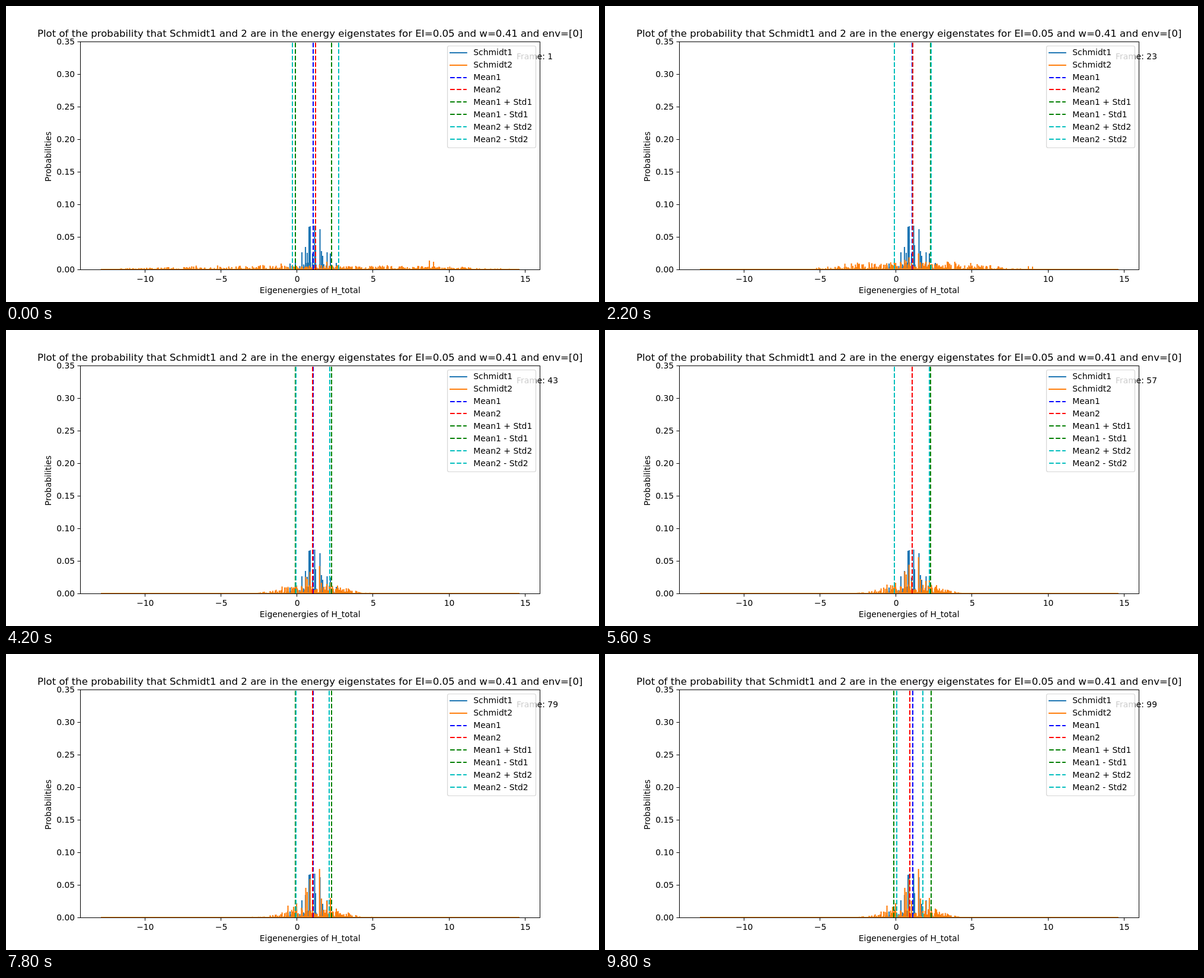
Write an HTML page that moves like this. It is 1000 px wide and 500 px high and loops after 9.9 s.

```html
<!DOCTYPE html>
<html lang="en">
<head>
<meta charset="utf-8">
<title>Eigenstate probabilities</title>
<style>
  html, body { margin: 0; width: 100%; height: 100%; overflow: hidden; background: #fff; }
  svg { display: block; width: 1000px; height: 500px; }
  text { font: 13.889px "DejaVu Sans", sans-serif; fill: #000; }
  .title { font-size: 16.605px; }
  .mid { text-anchor: middle; }
  .end { text-anchor: end; }
  .line { fill: none; stroke-width: 2.083; }
  .key { fill: none; stroke-width: 2; stroke-linecap: square; }
  .dash { fill: none; stroke-width: 2; stroke-dasharray: 7.71 3.33; }
  .axis { fill: none; stroke: #000; stroke-width: 1; }
</style>
</head>
<body>
<svg id="plot" viewBox="0 0 1000 500" xmlns="http://www.w3.org/2000/svg">
  <clipPath id="area"><rect x="125" y="60" width="776" height="385"/></clipPath>
  <g id="data" clip-path="url(#area)"></g>
  <g id="axes"></g>
  <text id="count" x="861" y="90"></text>
  <g id="legend"></g>
</svg>
<script>
const STEP = 100, STEPS = 99, BASE = 445, CENTER = 518;
const BLUE = '#1f77b4', ORANGE = '#ff7f0e';
const MARK_COLORS = ['#00f', '#f00', '#008000', '#008000', '#00bfbf', '#00bfbf'];
const $ = id => document.getElementById(id);

function add(parent, tag, attrs, text) {
  const el = document.createElementNS('http://www.w3.org/2000/svg', tag);
  for (const k in attrs) el.setAttribute(k, attrs[k]);
  if (text) el.textContent = text;
  $(parent).appendChild(el);
  return el;
}

// Piecewise linear lookup, constant beyond both ends
function lerp(xs, ys, x) {
  if (x <= xs[0]) return ys[0];
  const i = xs.findIndex(k => x <= k);
  if (i < 0) return ys[ys.length - 1];
  return ys[i - 1] + (ys[i] - ys[i - 1]) * (x - xs[i - 1]) / (xs[i] - xs[i - 1]);
}

function seeded(s) {
  return () => (s = (s * 16807) % 2147483647) / 2147483647;
}

const rnd = seeded(4127);
const noise = Array.from({ length: 700 }, (_, i) => ({
  x: 160.5 + i + rnd() * .9, size: rnd() ** 2.2, phase: rnd() * 6.28
}));
const blueNoise = Array.from({ length: 70 }, () => ({
  x: 470 + rnd() * 100, size: rnd() ** 2
}));

// Tall lines. Orange: x, height that fades out, height that grows in. Blue: x, height.
const ORANGE_PEAKS = [
  [464, 10, 5], [475.5, 4, 20], [485, 5, 18], [490, 6, 24],
  [505.5, 4, 50], [508, 4, 43], [512.7, 4, 65], [517, 6, 28], [528.7, 8, 82],
  [532, 7, 32], [541, 13, 28], [547, 6, 33], [557, 6, 15], [714, 15, 0], [721, 13, 0]
];
const BLUE_PEAKS = [
  [479, 10], [488, 13], [499, 29], [505, 38], [508, 28], [511, 72], [513, 73], [517, 27],
  [520.5, 74], [522, 41], [529.5, 68], [532, 31], [534, 23], [541.5, 29], [547, 27], [557, 11]
];

const spike = (x, h) => h < .3 ? '' : `M${x.toFixed(2)} ${BASE}V${(BASE - h).toFixed(2)}`;
const floorLine = `M160 ${BASE}H866`;

// The noise starts low and wide, then gathers around the centre
function orangePath(n) {
  const spread = Math.exp(-((n / 22) ** 2));
  const grow = Math.min(1, n / 75);
  const width = 62 + 238 * spread;
  const height = 15 - 7.5 * spread;
  const limit = x => {
    const d = Math.abs(x - CENTER);
    return height * Math.exp(-((d / width) ** 4)) + 3 * (1 - spread) * Math.exp(-d / 110);
  };
  const wobble = p => .9 + .15 * Math.sin(n * .12 + p.phase);
  return floorLine
    + noise.map(p => spike(p.x, limit(p.x) * p.size * wobble(p))).join('')
    + ORANGE_PEAKS.map(([x, from, to]) => spike(x, from * spread + to * grow)).join('');
}

function bluePath() {
  return floorLine
    + blueNoise.map(p => spike(p.x, 14 * p.size * Math.exp(-(((p.x - 520) / 30) ** 2)))).join('')
    + BLUE_PEAKS.map(p => spike(...p)).join('');
}

// Marker positions from the mean and deviation of both states
const KEYS = [0, 14, 29, 40, 50, 70, 87, 98];
const MEAN2 = [522, 521, 517, 517.3, 517.3, 518, 515.6, 514];
const STD2 = [39, 36, 27, 28.6, 28.6, 30.5, 25.5, 22];

function markerXs(n) {
  const m1 = lerp([87, 98], [518, 518.6], n), s1 = lerp([87, 98], [30.5, 31.5], n);
  const m2 = lerp(KEYS, MEAN2, n), s2 = lerp(KEYS, STD2, n);
  return [m1, m2, m1 + s1, m1 - s1, m2 + s2, m2 - s2].map(Math.round);
}

add('data', 'path', { class: 'line', stroke: BLUE, d: bluePath() });
const orange = add('data', 'path', { class: 'line', stroke: ORANGE });
const markers = MARK_COLORS.map(stroke => add('data', 'path', { class: 'dash', stroke }));

function drawAxes() {
  add('axes', 'rect', { class: 'axis', x: 125.5, y: 60.5, width: 775, height: 385 });
  for (let v = -10; v <= 15; v += 5) {
    const x = 490.6 + v * 25.64;
    add('axes', 'path', { class: 'axis', d: `M${Math.floor(x) + .5} 445.5v5` });
    add('axes', 'text', { class: 'mid', x: x + .6, y: 466 }, String(v).replace('-', '\u2212'));
  }
  for (let i = 0; i <= 7; i++) {
    const y = BASE - i * 55;
    add('axes', 'path', { class: 'axis', d: `M125.5 ${y + .5}h-5` });
    add('axes', 'text', { class: 'end', x: 116.2, y: y + 5 }, (i * .05).toFixed(2));
  }
  add('axes', 'text', { class: 'mid', x: 512.7, y: 485 }, 'Eigenenergies of H_total');
  add('axes', 'text', { class: 'mid', transform: 'translate(76 254.3) rotate(-90)' }, 'Probabilities');
  add('axes', 'text', { class: 'mid title', x: 512.7, y: 52 },
    'Plot of the probability that Schmidt1 and 2 are in the energy eigenstates for EI=0.05 and w=0.41 and env=[0]');
}

function drawLegend() {
  add('legend', 'rect', {
    x: 744.5, y: 67.5, width: 149, height: 172, rx: 2.8,
    fill: '#fff', stroke: '#ccc', opacity: .8, 'stroke-width': 1.2
  });
  const labels = ['Schmidt1', 'Schmidt2', 'Mean1', 'Mean2',
    'Mean1 + Std1', 'Mean1 - Std1', 'Mean2 + Std2', 'Mean2 - Std2'];
  const colors = [BLUE, ORANGE, ...MARK_COLORS];
  labels.forEach((label, i) => {
    add('legend', 'path', {
      class: i < 2 ? 'key' : 'dash', stroke: colors[i], d: `M749 ${Math.round(79 + i * 20.83)}h27.8`
    });
    add('legend', 'text', { x: 788.3, y: 83 + i * 21 }, label);
  });
}

let shown = -1;
function draw(ms) {
  const n = Math.floor(ms / STEP) % STEPS;
  if (n === shown) return;
  shown = n;
  orange.setAttribute('d', orangePath(n));
  markerXs(n).forEach((x, i) => markers[i].setAttribute('d', `M${x} ${BASE}V60`));
  $('count').textContent = `Frame: ${n + 1}`;
}

drawAxes();
drawLegend();
draw(0);
const start = performance.now();
(function tick() {
  draw(performance.now() - start);
  requestAnimationFrame(tick);
})();
</script>
</body>
</html>
```
